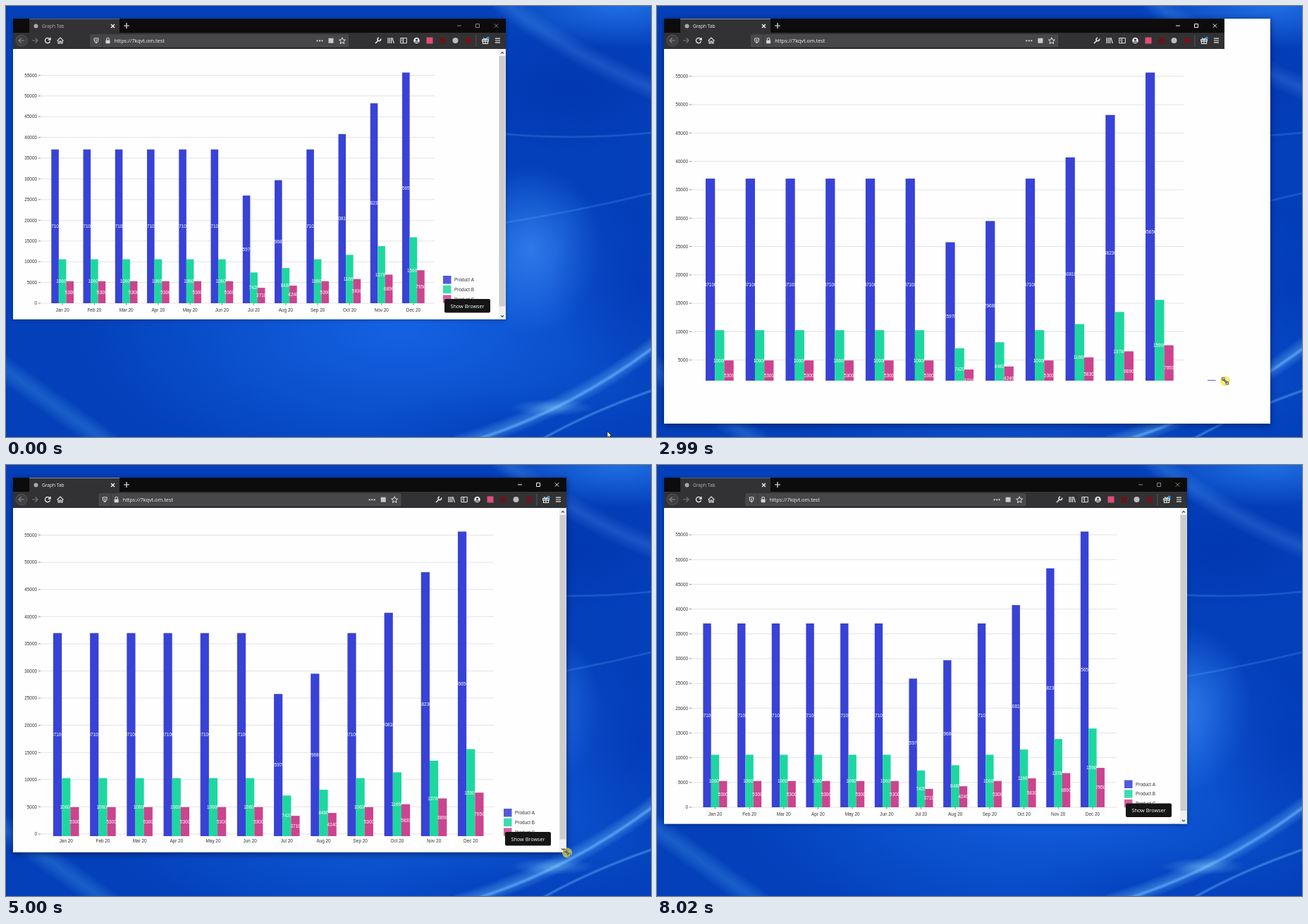
An HTML page with a canvas for the animation above (8.1 s loop, 915x612 px).

```html
<!DOCTYPE html>
<html lang="en">
<head>
<meta charset="utf-8">
<title>Resizing a chart window</title>
<style>
  html, body { margin: 0; width: 100%; height: 100%; overflow: hidden; background: #0342bd; }
  canvas { display: block; }
</style>
</head>
<body>
<canvas id="stage" width="915" height="612"></canvas>
<script>
const LOOP = 8100, DRAG = 1800, STEP = 78, LAST = 54;
const stage = document.getElementById('stage').getContext('2d');
let c = stage;

const LEFT = 10, TOP = 18, PAGE = 61, AXIS = 48.5, PEAK = 94.5;
const UI = '"Open Sans", "Noto Sans", sans-serif';
const CHART = '"Liberation Sans", Arial, sans-serif';
const MONTHS = 'Jan Feb Mar Apr May Jun Jul Aug Sep Oct Nov Dec'.split(' ');
const LEVEL = [70, 70, 70, 70, 70, 70, 49, 56, 70, 77, 91, 105];
const SERIES = [
  { unit: 530, color: '#3842d6', soft: '#515adc' },
  { unit: 10600 / 70, color: '#1ed7a0', soft: '#3ddcad' },
  { unit: 5300 / 70, color: '#cb448f', soft: '#d2609f' }
];

// step, window right, window bottom
const WINDOW = [
  [0, 709, 445], [2, 745, 474], [6, 841, 557], [10, 865, 586], [12, 876, 600],
  [13, 866, 590], [15, 805, 532], [21, 714, 466], [25, 684, 434], [29, 662, 412],
  [33, 690, 440], [41, 795, 550], [43, 799, 555], [49, 766, 523], [54, 752, 509.5]
];
// step, how far the page layout trails the window
const TRAIL = [
  [0, 0, 0], [6, -57, -52], [12, -14, -15], [15, 65, 61], [18, 30, 22], [21, 0, 0]
];
// step, grid right, axis zero, bar zero, first bar, month pitch
const PLOT = [
  [0, 608, 422, 422, 64.3, 45.25],
  [5, 608, 422, 422, 64.2, 45.25],
  [6, 609.5, 424, 425.3, 64, 45.55],
  [10, 700, 505, 510, 66.5, 52.5],
  [15, 748, 543, 546.3, 69, 56.73],
  [21, 645, 466, 458, 66, 49],
  [25, 596, 426, 422, 65, 44.05],
  [30, 565, 393, 391, 64, 42.2],
  [33, 580, 410, 411, 64, 43.5],
  [41, 692, 524, 527, 67, 52.18],
  [44, 697, 530, 531, 67, 52.4],
  [49, 670, 505, 503, 66, 50.3],
  [54, 652, 486, 486, 65.4, 48.68]
];

const mix = (a, b, k) => a + (b - a) * k;

function at(keys, n) {
  let i = keys.findIndex(k => k[0] > n);
  if (i < 0) return keys[keys.length - 1].slice(1);
  if (i === 0) return keys[0].slice(1);
  const a = keys[i - 1], b = keys[i], k = (n - a[0]) / (b[0] - a[0]);
  return a.slice(1).map((v, j) => mix(v, b[j + 1], k));
}

function box(x, y, w, h, color) {
  c.fillStyle = color;
  c.fillRect(x, y, w, h);
}

function rounded(x, y, w, h, r, color) {
  c.fillStyle = color;
  c.beginPath();
  c.roundRect(x, y, w, h, r);
  c.fill();
}

function disc(x, y, r, color) {
  c.fillStyle = color;
  c.beginPath();
  c.arc(x, y, r, 0, 7);
  c.fill();
}

function stroke(path, color, width = 1) {
  c.strokeStyle = color;
  c.lineWidth = width;
  c.stroke(new Path2D(path));
}

function icon(x, y, path, color = '#e4e4e6', width = 1) {
  c.save();
  c.translate(x, y);
  stroke(path, color, width);
  c.restore();
}

function text(s, x, y, size, color, align = 'left', family = CHART) {
  c.font = size + 'px ' + family;
  c.textAlign = align;
  c.textBaseline = 'alphabetic';
  c.fillStyle = color;
  c.fillText(s, x, y + size * 0.36);
}

function glow(x, y, rx, ry, rgb, alpha) {
  c.save();
  c.translate(x, y);
  c.scale(rx, ry);
  const g = c.createRadialGradient(0, 0, 0, 0, 0, 1);
  g.addColorStop(0, `rgba(${rgb},${alpha})`);
  g.addColorStop(0.5, `rgba(${rgb},${alpha * 0.5})`);
  g.addColorStop(1, `rgba(${rgb},0)`);
  c.fillStyle = g;
  c.fillRect(-1, -1, 2, 2);
  c.restore();
}

function streak(path, width, alpha) {
  for (let i = 0; i < 8; i++) {
    stroke(path, `rgba(110,185,255,${alpha / 8})`, width * (1 - i / 8));
  }
}

function paintWallpaper() {
  const canvas = document.createElement('canvas');
  canvas.width = 915;
  canvas.height = 612;
  c = canvas.getContext('2d');
  box(0, 0, 915, 612, '#0340ba');
  glow(560, 455, 460, 230, '26,110,240', 0.75);
  glow(745, 345, 100, 120, '70,150,255', 0.6);
  glow(870, 0, 190, 60, '45,130,245', 0.7);
  glow(800, 120, 170, 90, '0,40,160', 0.35);
  glow(900, 400, 130, 140, '0,50,175', 0.5);
  glow(700, 600, 200, 60, '0,55,180', 0.4);
  streak('M700 -10Q800 70 925 120', 34, 0.22);
  streak('M690 180Q800 192 915 180', 4, 0.3);
  streak('M680 312Q800 294 915 266', 4, 0.3);
  streak('M-10 510Q60 560 150 625', 36, 0.25);
  streak('M640 622Q800 575 925 478', 26, 0.4);
  streak('M660 618Q800 575 925 480', 6, 0.8);
  streak('M755 618Q830 575 925 543', 5, 0.6);
  glow(775, 570, 60, 12, '150,225,255', 0.35);
  c = stage;
  return canvas;
}

function drawChrome(R, active) {
  const ink = active ? '#f2f2f2' : '#858587';
  box(LEFT, TOP, R - LEFT, 20, '#0c0c0d');
  box(LEFT, 38, R - LEFT, 23, '#323234');
  box(33, TOP, 128, 20, '#323234');
  box(33, TOP, 128, 1, active ? '#8b8b90' : '#606064');
  disc(42.5, 28.5, 3, '#a9a9ad');
  text('Graph Tab', 51, 29, 6.6, active ? '#f5f5f5' : '#b4b4b6', 'left', UI);
  icon(151.5, 28.5, 'M-2.5 -2.5L2.5 2.5M2.5 -2.5L-2.5 2.5', '#fff', 1.2);
  icon(171, 28, 'M-4 0H4M0 -4V4', '#eee', 1.2);
  icon(R - 66, 28, 'M-3 0H3', ink);
  icon(R - 40, 28, 'M-2.5 -2.5H2.5V2.5H-2.5Z', ink);
  icon(R - 13.5, 28, 'M-2.7 -2.7L2.7 2.7M2.7 -2.7L-2.7 2.7', ink);

  disc(22, 49, 8.5, '#57575a');
  disc(22, 49, 7.8, '#414144');
  icon(22, 49, 'M4 0H-4M-.5 -3.5L-4 0L-.5 3.5', '#88888b', 1.2);
  icon(41, 49, 'M-4 0H4M.5 -3.5L4 0L.5 3.5', '#77777a', 1.2);
  icon(59, 49, 'M3 -2A3.6 3.6 0 1 0 3.5 1M4 -4.2V-1H.8', '#eee', 1.3);
  icon(77, 49, 'M-4.5 .3L0 -4L4.5 .3M-3 0V4H-1V1H1V4H3V0', '#eee', 1.1);

  const u = 119.5 + (R - 709) * 0.142, v = 486 + (R - 709) * 0.863;
  rounded(u, 40.5, v - u, 17.5, 1.5, '#58585b');
  rounded(u + 0.6, 41.1, v - u - 1.2, 16.3, 1.2, '#474749');
  box(u + 17, 41, 0.8, 16.5, '#353538');
  icon(u + 8.5, 49, 'M-3 -3Q0 -3 0 -4Q0 -3 3 -3Q3.5 2 0 4Q-3.5 2 -3 -3M0 -2V3');
  rounded(u + 22, 48.5, 6, 4.8, 0.8, '#d5d5d8');
  icon(u + 25, 48.5, 'M-1.8 0V-1.5A1.8 1.8 0 0 1 1.8 -1.5V0', '#d5d5d8', 1.1);
  text('https://7kqvt.om.test', u + 34, 49.6, 7.3, '#f7f7f8', 'left', UI);
  for (const d of [-3.5, 0, 3.5]) disc(v - 41 + d, 49.3, 1.1, '#e4e4e6');
  rounded(v - 28.5, 45.7, 7, 7, 0, '#c9c9cc');
  icon(v - 9, 49.3, 'M0 -4.5L1.3 -1.4L4.5 -1.2L2 1L2.8 4.2L0 2.4L-2.8 4.2L-2 1L-4.5 -1.2L-1.3 -1.4Z');

  icon(R - 181.5, 49, 'M-3.5 4L1 -.5M4 -2.5A2.3 2.3 0 1 1 1.6 -4', '#e4e4e6', 1.7);
  icon(R - 163, 49, 'M-4 -4V4M-1.7 -4V4M.6 -4V4M2 -3.8L4.3 4', '#e4e4e6', 1.2);
  icon(R - 145, 49, 'M-4.3 -3.5H4.3V3.7H-4.3ZM-.5 -3.5V3.5M-3 -1.5H-1.7M-3 .5H-1.7');
  disc(R - 126.5, 49, 4.3, '#e4e4e6');
  disc(R - 126.5, 48, 1.6, '#323234');
  box(R - 129, 50.6, 5, 1.2, '#323234');
  box(R - 112.5, 44.5, 9, 9, '#df4d78');
  box(R - 93.5, 45, 8, 8, '#671518');
  disc(R - 71.5, 49, 4, '#bdbdc0');
  disc(R - 53, 49, 4.2, '#74121b');
  box(R - 42.5, 41, 0.8, 17, '#606063');
  icon(R - 29, 49.5, 'M-4.3 -1.8H4.3V.4H-4.3ZM-3.5 .4V4H3.5V.4M0 -2V4M-3 -4L0 -2L2 -4', '#e4e4e6', 1.2);
  disc(R - 25.3, 45.3, 1.9, '#259bf4');
  icon(R - 11.5, 49, 'M-3.5 -2.8H3.5M-3.5 0H3.5M-3.5 2.8H3.5', '#eee', 1.2);
}

function drawChart([right, zero, base, first, pitch]) {
  const gridZero = Math.min(zero, base), bar = pitch * 0.7 / 3;
  for (let v = 0; v <= 55000; v += 5000) {
    const k = v / 55650, y = mix(zero, PEAK, k);
    box(AXIS, mix(gridZero, PEAK, k) - 0.5, right - AXIS, 1, '#e3e3e6');
    box(46, y - 0.5, 2.8, 1, '#85858a');
    text(v, 44, y, 6.4, '#333', 'right');
  }
  MONTHS.forEach((m, i) => {
    const x = first + pitch * i + bar * 1.5;
    box(x - 0.5, zero, 1, 2.8, '#85858a');
    text(m + ' 20', x, zero + 9.2, 6.4, '#333', 'center');
  });
  SERIES.forEach((s, j) => LEVEL.forEach((level, i) => {
    const value = Math.round(level * s.unit);
    const h = value / 55650 * (base - PEAK), x = first + pitch * i + bar * j;
    box(x, base - h, bar, h, s.color);
    text(value, x + bar / 2, base - h / 2, 6.4, '#fff', 'center');
  }));
}

function drawPage(pr, pb, plot) {
  box(LEFT, PAGE, pr - LEFT, pb - PAGE, '#fefefe');
  drawChart(plot);
  SERIES.forEach((s, i) => {
    const y = pb - 62 + 13.7 * i;
    box(pr - 89, y, 11.5, 11.5, s.soft);
    text('Product ' + 'ABC'[i], pr - 73, y + 5.8, 6.4, '#333');
  });
  rounded(pr - 87, pb - 29, 65, 19.5, 2, '#151515');
  text('Show Browser', pr - 54.5, pb - 19, 7.27, '#fff', 'center', UI);
  box(pr - 10, PAGE, 10, pb - PAGE, '#f0f0f0');
  box(pr - 9.5, 71, 9, pb - 18.5 - 71, '#cdcdcd');
  icon(pr - 5, 66.5, 'M-2 1L0 -1L2 1', '#505050', 1.2);
  icon(pr - 5, pb - 4.5, 'M-2 -1L0 1L2 -1', '#505050', 1.2);
}

function drawWindow(n, active) {
  const [R, B] = at(WINDOW, n), [dx, dy] = at(TRAIL, n);
  const pr = R + dx, pb = B + dy;
  c.save();
  c.shadowColor = active ? 'rgba(0,10,50,.6)' : 'rgba(0,10,50,.4)';
  c.shadowBlur = active ? 9 : 5;
  c.shadowOffsetY = active ? 2 : 1;
  box(LEFT, TOP, Math.max(R, pr) - LEFT, Math.max(B, pb) - TOP, dx > 0 ? '#fefefe' : '#f9f9f9');
  c.restore();
  c.save();
  c.beginPath();
  c.rect(LEFT, PAGE, R - LEFT, B - PAGE);
  c.clip();
  drawPage(pr, pb, at(PLOT, n));
  c.restore();
  drawChrome(R, active);
}

function drawArrow(x, y) {
  c.save();
  c.translate(x, y);
  const p = new Path2D('M0 0V8.6L2 6.8L3.4 9.8L4.8 9.2L3.5 6.2H6.2Z');
  c.fillStyle = '#fff';
  c.fill(p);
  c.strokeStyle = '#111';
  c.lineWidth = 0.7;
  c.stroke(p);
  c.restore();
}

function drawResize(x, y, pressed) {
  if (pressed) disc(x, y, 7, 'rgba(243,226,50,.68)');
  const p = 'M-3.6 -3.6L3.6 3.6M-3.8 -.6V-3.8H-.6M3.8 .6V3.8H.6';
  icon(x, y, p, '#222', 2.2);
  icon(x, y, p, '#fff', 0.9);
}

function drawPointer(t, n) {
  if (t < 870) {
    const k = t < 70 ? 0 : (Math.floor((t - 70) / 80) + 1) / 11;
    const e = k * k * (3 - 2 * k);
    drawArrow(mix(853, 707, e), mix(604, 444, e));
  } else if (t < 1010) {
    drawArrow(707, 444);
  } else if (t < 6090) {
    const [R, B] = at(WINDOW, n);
    drawResize(R + (n > 0 ? 1 : -1), B + 0.5, t >= 1240 && t < 6030);
  } else if (t < 6320) {
    const k = (Math.floor((t - 6090) / 80) + 1) / 3;
    drawArrow(mix(752, 868, k), mix(510, 592, k));
  }
}

const wallpaper = paintWallpaper();

function frame() {
  const t = performance.now() % LOOP;
  const n = Math.max(0, Math.min(LAST, Math.floor((t - DRAG) / STEP)));
  c.drawImage(wallpaper, 0, 0);
  drawWindow(n, t >= DRAG && t < 7950);
  drawPointer(t, n);
  requestAnimationFrame(frame);
}
frame();
</script>
</body>
</html>
```
